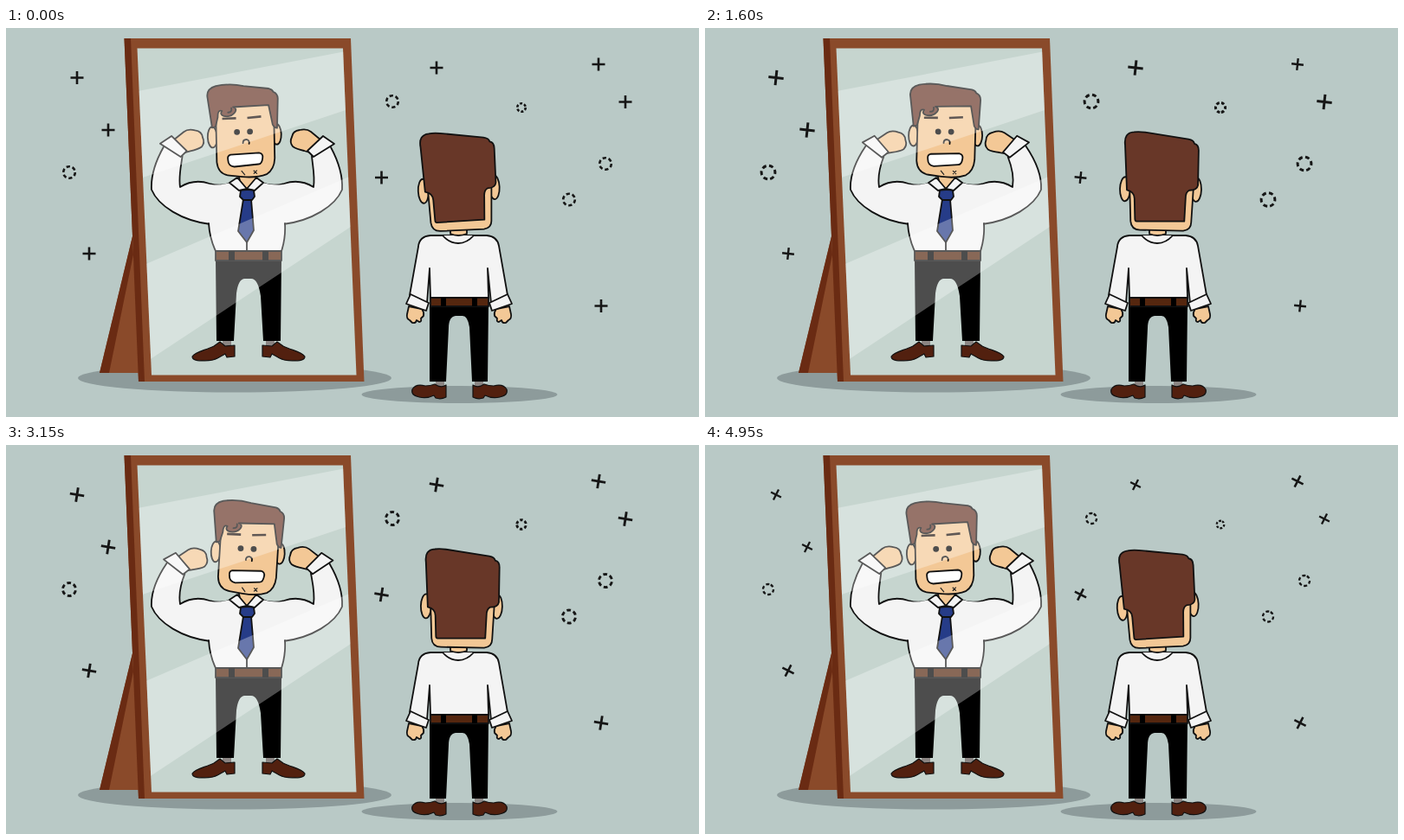
Animation of 800x450 px, one loop 5000 ms. Source, as an HTML page:

```html
<!DOCTYPE html>
<html lang="en">
<head>
<meta charset="utf-8">
<title>Man at the mirror</title>
<style>
  html, body { margin: 0; width: 100%; height: 100%; overflow: hidden; background: #b9c9c6; }
  svg { display: block; width: 100%; height: 100%; }
  .ink { stroke: #111; stroke-width: 1.8; stroke-linejoin: round; stroke-linecap: round; }
  .line { fill: none; }
  .skin { fill: #f3c896; }
  .shirt { fill: #f4f4f4; }
  .hair { fill: #683728; }
  .shoe { fill: #52200f; stroke-width: 1.2; }
  .belt { fill: #55270f; }
  .tie { fill: #263c88; }
  .wood { fill: #8a4a2a; }
  .dark { fill: #6a2b13; }
  .shade { fill: #8d9b9b; }
  .sock { fill: #8b8583; }
</style>
</head>
<body>
<svg viewBox="0 0 800 450" xmlns="http://www.w3.org/2000/svg">
  <defs>
    <clipPath id="glass"><path id="pane" d="M151.500 23.500H389L404.500 401.500H168Z"/></clipPath>
    <g id="frontFoot">
      <path class="sock" d="M250 360H260V369H250Z"/>
      <path class="shoe ink" d="M215 380C219 374 230 373 240 368L247 363L253 368L264 367V380L255 381L253 377C247 380 243 384 236 384.500C226 385 215 386 215 380Z"/>
    </g>
    <g id="backFoot">
      <path class="sock" d="M496 406H506V416H496Z"/>
      <path class="shoe ink" d="M495 412Q502 417 508 413V427Q502 430 496 428L494 425Q486 429 477 427Q467 425 469 418Q473 411 484 414Q490 414 495 412Z"/>
    </g>
    <g id="backHand">
      <path class="skin ink" d="M465 322L463 331Q462 336 466 338L469 341Q473 342 474 338L477 340Q480 340 479 336L482 333Q483 329 480 325Z"/>
      <path class="shirt ink" d="M467 308L488 318L485 327L462 319Z"/>
    </g>
  </defs>

  <rect width="800" height="450" fill="#b9c9c6"/>
  <ellipse class="shade" cx="264" cy="405" rx="181" ry="16.5"/>

  <path class="wood" d="M146 241L108 399H155Z"/>
  <path class="dark" d="M146 241L108 399H119L147 262Z"/>
  <path class="wood" d="M136.500 12H398L413.500 409H153Z"/>
  <path class="dark" d="M136.500 12H144L160 409H153Z"/>
  <use href="#pane" fill="#c6d5cf"/>

  <g id="reflection">
    <use href="#frontFoot"/>
    <use href="#frontFoot" transform="matrix(-1 0 0 1 560 0)"/>
    <path d="M242 268H318L317 362H297L294 310Q291 290 283 290H275Q268 291 266 307L263 362H243Z"/>
    <g id="leftArm"></g>
    <g id="rightArm" transform="matrix(-1 0 0 1 556 0)"></g>
    <path class="shirt" d="M234 227L231 181Q247 183 262 178H293Q308 183 324 181L321 227Q325 240 318 258H242Q235 243 234 227Z"/>
    <path class="ink line" d="M234 226Q235 243 242 258M322 226Q323 243 318 258M278 246V258"/>
    <path class="belt ink" d="M242 258H318V269H242Z"/>
    <path d="M257 258H264V269H257ZM296 258H303V269H296Z"/>
    <path class="skin ink" d="M268 168L270 177L278 187L287 177L291 168Z"/>
    <path class="shirt ink" d="M267 173L258 179L269 188L278 186ZM289 173L297 179L287 188L278 186Z"/>
    <path class="tie ink" d="M274 198H283L286 234L278 248L268 235Z"/>
    <path class="tie ink" d="M271 188Q279 186 286 188L287 195L284 199H274L270 195Z"/>
    <g id="face">
      <ellipse class="skin ink" cx="240" cy="125" rx="5.5" ry="12"/>
      <ellipse class="skin ink" cx="314" cy="124" rx="5.5" ry="12"/>
      <path class="skin ink" d="M245 90L244 154Q245 168 258 170L273 172Q290 174 301 170Q310 165 311 152L312 88Z"/>
      <path class="hair ink" d="M240 114L236 80Q234 69 246 66Q262 63 278 67L307 71Q311 72 312 75Q317 77 317 83L315 117Q312 117 310 113L306 90L265 91Q270 93 267 97Q262 103 254 101Q249 99 252 95Q247 93 247 102L244 113Z"/>
      <path class="ink line" d="M259 97Q264 97 263 92"/>
      <path d="M252 104L268 104M281 104L297 103" stroke="#1b100c" stroke-width="2.600"/>
      <circle cx="268.500" cy="120" r="3.400"/>
      <circle cx="283.500" cy="120" r="3.400"/>
      <path class="ink line" d="M275 133Q275 129 279 129Q283 130 282 134"/>
      <path class="ink" fill="#fff" d="M260 146L293 145Q298 146 297 151Q296 158 292 158L264 160Q257 159 257 152Q256 147 260 146Z"/>
      <path d="M286 165L290 169M290 165L286 169M272 165L276 170" stroke="#222" stroke-width="1.200"/>
    </g>
  </g>
  <path clip-path="url(#glass)" fill="#fff" opacity=".3" d="M150 73.500L392 27V95L150 175.500ZM150 278L410 166V222L150 394Z"/>

  <ellipse class="shade" cx="523.500" cy="424" rx="113" ry="10"/>
  <g id="viewer">
    <use href="#backFoot"/>
    <use href="#backFoot" transform="matrix(-1 0 0 1 1047 0)"/>
    <path d="M489 321H557L556 409H538L535 346Q533 333 527 333H519Q511 334 511 347L508 409H489Z"/>
    <path class="shirt ink" d="M476 253Q477 241 490 240H555Q567 241 569 252L579 309L560 318L556 278L557 312H490L489 278L486 318L466 309Z"/>
    <use href="#backHand"/>
    <use href="#backHand" transform="matrix(-1 0 0 1 1046 0)"/>
    <path class="belt ink" d="M490 312H557V322H490Z"/>
    <path d="M502 312H508V322H502ZM538 312H544V322H538Z"/>
    <path class="shirt ink" d="M504 240Q512 249 522 249Q532 249 540 240"/>
    <path class="skin ink" d="M513 230V238Q522 242 532 238V230Z"/>
    <g id="nape">
      <ellipse class="skin ink" cx="484" cy="187" rx="6" ry="14"/>
      <ellipse class="skin ink" cx="566" cy="186" rx="6" ry="14"/>
      <path class="skin ink" d="M489 180L491 224Q492 234 502 234H552Q561 233 561 224L563 180Z"/>
      <path class="hair ink" d="M483 136Q481 122 493 121Q498 120 506 121L556 128Q562 129 563 133Q568 134 568 141V181Q567 187 558 187Q554 189 554 196L553 223L498 224Q496 224 496 221L495 198Q495 190 486 188Z"/>
    </g>
  </g>
  <g id="sparks" fill="none" stroke="#161616" stroke-width="2.600"></g>
</svg>
<script>
  const LOOP = 5000, STEP = 50, TURN = 2 * Math.PI;
  const el = id => document.getElementById(id);
  const set = (node, k, v) => node.setAttribute(k, v);
  const add = (parent, tag, attrs = {}) => {
    const node = document.createElementNS('http://www.w3.org/2000/svg', tag);
    for (const k in attrs) set(node, k, attrs[k]);
    return parent.appendChild(node);
  };

  // One smooth sway from 0 to 1 and back per loop.
  const sway = t => (1 - Math.cos(TURN * t / 5)) / 2;
  // Forearm angle: a quicker flexing beat that grows and fades with the sway.
  const flex = (t, lag, base) => sway(t - lag) * (base + 6.5 * Math.cos(TURN * (t - 2.05) / 1.9));

  function makeArm(group, lag, base) {
    const elbow = [195, 180];
    const fill = add(group, 'path', { class: 'shirt' });
    const edge = add(group, 'path', { class: 'ink line' });
    const fist = add(group, 'g');
    add(fist, 'path', { class: 'skin ink', d: 'M192 130L204 120Q209 116 217 118Q225 119 226 126Q229 132 225 137Q221 140 212 142L202 145Z' });
    add(fist, 'path', { class: 'shirt ink', d: 'M177 134L190 125L208 142L201 149Z' });
    return t => {
      const angle = flex(t, lag, base), a = angle * Math.PI / 180;
      const turn = (x, y) => {
        const px = x - elbow[0], py = y - elbow[1];
        return [elbow[0] + px * Math.cos(a) - py * Math.sin(a),
                elbow[1] + px * Math.sin(a) + py * Math.cos(a)];
      };
      const outer = `M${turn(181, 138)}C${turn(173, 153)} 167 170 168 187C176 206 203 223 236 227`;
      const inner = `262 178C252 183 242 182 235 180C220 175 209 179 201 184C199 172 202 160 ${turn(203, 148)}`;
      set(fill, 'd', outer + 'L' + inner + 'Z');
      set(edge, 'd', outer + 'M' + inner);
      set(fist, 'transform', `rotate(${angle} ${elbow})`);
    };
  }

  // Every spark spins at the same rate; its size breathes with its own period.
  function makeSpark(x, y, period, size, tag, attrs) {
    const node = add(el('sparks'), tag, attrs);
    return t => {
      const scale = 1 + size * Math.sin(TURN * t / period);
      set(node, 'transform', `translate(${x} ${y}) rotate(${60 * t}) scale(${scale})`);
    };
  }
  const cross = (period, size) => ([x, y]) =>
    makeSpark(x, y, period, size, 'path', { d: 'M-7.5 0H7.5M0-7.5V7.5' });
  const ring = r => ([x, y]) => {
    const dash = TURN * r / 6;
    return makeSpark(x, y, 8, .17, 'circle', { r, 'stroke-dasharray': `${dash * .6} ${dash * .4}` });
  };

  const parts = [
    makeArm(el('leftArm'), .4, 12),
    makeArm(el('rightArm'), 0, 8),
    ...[[96, 261], [684, 42], [433.5, 173], [687, 321.5]].map(cross(2.5, .1)),
    ...[[82, 57.5], [118, 118], [497, 46], [715, 85.5]].map(cross(8, .17)),
    ...[[73, 167], [446, 85], [650, 198.5], [692, 157]].map(ring(6.8)),
    ring(4.8)([595, 92])
  ];

  function draw(ms) {
    const t = Math.floor(ms % LOOP / STEP) * STEP / 1000;
    set(el('face'), 'transform', `rotate(${-2.2 + 5.2 * sway(t - .25)} 278 172)`);
    set(el('nape'), 'transform', `rotate(${-2.6 + 4.7 * sway(t + .15)} 522 237)`);
    parts.forEach(pose => pose(t));
  }

  let start;
  function tick(now) {
    start ??= now;
    draw(now - start);
    requestAnimationFrame(tick);
  }
  draw(0);
  requestAnimationFrame(tick);
</script>
</body>
</html>
```
